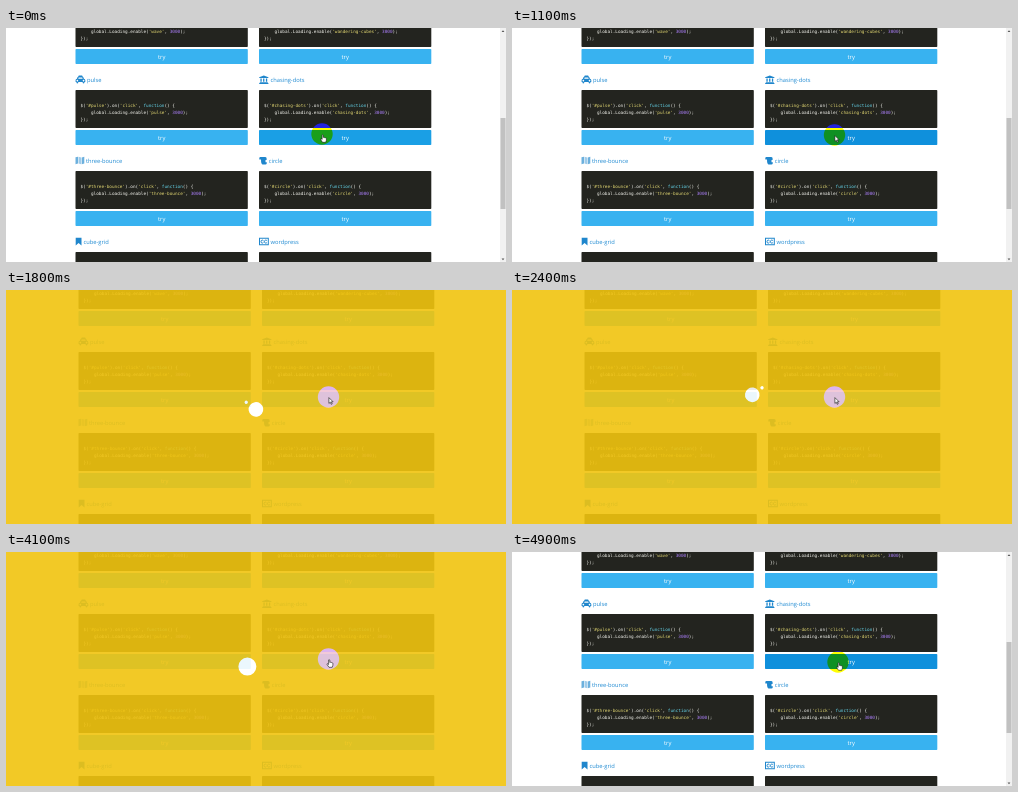
Recreate the animation shown at these times as an HTML page. Size 500x234 px, loop 5 s.

```html
<!DOCTYPE html>
<html lang="en">
<head>
<meta charset="utf-8">
<title>Loading demo</title>
<style>
html, body { margin: 0; width: 100%; height: 100%; overflow: hidden; background: #fff; }
svg { display: block; width: 100%; height: 100%; }
text { text-rendering: geometricPrecision; white-space: pre; }
.code { font: 4.36px "DejaVu Sans Mono", "Noto Sans Mono", monospace; fill: #f8f8f2; }
.str { fill: #e6db74; }
.key { fill: #66d9ef; }
.num { fill: #ae81ff; }
.head { font: 5.75px "Open Sans", "Noto Sans", sans-serif; fill: #1f8ad2; }
.try { font: 5.8px "Open Sans", "Noto Sans", sans-serif; fill: #fff; text-anchor: middle; }
.icon { fill: #1f86cc; }
#halo { mix-blend-mode: difference; }
</style>
</head>
<body>
<svg viewBox="0 0 500 234" xmlns="http://www.w3.org/2000/svg">
  <rect width="500" height="234" fill="#fff"/>
  <g id="page"></g>
  <g id="bar">
    <rect x="494" width="6" height="234" fill="#f1f1f1"/>
    <rect x="494.5" y="90" width="5" height="91" fill="#c1c1c1"/>
    <path d="M495.6 4l1.4-1.8 1.4 1.8zM495.6 230.4l1.4 1.8 1.4-1.8z" fill="#555"/>
  </g>
  <g id="loader" opacity=".9">
    <rect width="500" height="234" fill="#f1c40f"/>
    <g id="spin" fill="#fff">
      <circle cx="9" cy="-6"/>
      <circle cx="9" cy="6"/>
    </g>
  </g>
  <circle id="halo" r="10.7" fill="#00f"/>
  <g id="cursor" fill="#fff" stroke="#111" stroke-width=".6" stroke-linejoin="round">
    <path id="arrow" d="M0 0V5.8L1.4 4.6 2.3 6.7 3.3 6.3 2.4 4.2H4.2Z"/>
    <path id="hand" d="M-.3 .3Q.4-.4 .9 .4V2.8Q1.6 2.3 2 3 2.7 2.6 3 3.3 3.9 3 4 3.9V5.6L3.3 7.7H.1L-1.8 5Q-2.1 4-1.2 4.1L-.3 4.9Z"/>
  </g>
</svg>
<script>
const $ = id => document.getElementById(id);
const PITCH = 81, COLS = [69.5, 253], WIDTH = 172.3;

// Each icon is drawn from its own left edge and the heading's middle line.
const icons = {
  car: '<path fill-rule="evenodd" d="M3.3-4H6.6L7.1-3Q8-2.8 8.4-.9 9.8-.6 9.8 .6V2.4H8.9V3.4Q8.1 4.3 7.2 3.4V2.4H2.7V3.4Q1.8 4.3 1 3.4V2.4H.1V.6Q.1-.6 1.4-.9 1.8-2.8 2.8-3ZM3.2-2 2.7-.9H7.2L6.7-2ZM1.8 .2a.8 .8 0 1 0 .1 0ZM8 .2a.8 .8 0 1 0 .1 0Z"/>',
  bank: '<path d="M4.8-4.2 9.4-2.3V-1.5H.2V-2.3ZM1.4-1H2.7V2.2H1.4ZM4.1-1H5.4V2.2H4.1ZM6.9-1H8.2V2.2H6.9ZM.8 2.4H8.8V3.1H.8ZM.2 3.4H9.4V4.3H.2Z"/>',
  map: '<g opacity=".65"><path d="M0-3.3 2.5-3.8V3L0 3.7Z"/><path d="M3-3.8 5.8-3.2V3.6L3 3Z" opacity=".65"/><path d="M6.3-3.2 8.8-3.8V3L6.3 3.6Z"/></g>',
  scroll: '<path d="M.3-2.4Q.3-3.7 1.4-3.7H6.3Q7.8-3.5 7.6-2V-.6H6.5V1.6H7.8V2.6Q7.5 3.8 6.4 3.8H3.5Q2 3.6 2-1H.3Z"/>',
  mark: '<path d="M.2-3.8H6V3.9L3.1 1.5 .2 3.9Z"/>',
  cc: '<path fill-rule="evenodd" d="M0-3.8H9.8V3.7H0ZM1-2.8V2.7H8.8V-2.8Z"/><path d="M4.5-.8Q3.9-1.6 3.1-1.5 2-1.3 2 0 2 1.4 3.1 1.5 3.9 1.6 4.5 .7M8-.8Q7.4-1.6 6.6-1.5 5.5-1.3 5.5 0 5.5 1.4 6.6 1.5 7.4 1.6 8 .7" fill="none" stroke="#1f86cc" stroke-width="1"/>'
};

// name, icon, heading text offset
const rows = [
  [['wave'], ['wandering-cubes']],
  [['pulse', 'car', 11.5], ['chasing-dots', 'bank', 11.5]],
  [['three-bounce', 'map', 10.5], ['circle', 'scroll', 9.7]],
  [['cube-grid', 'mark', 8], ['wordpress', 'cc', 11.5]]
];

const span = (kind, s) => `<tspan class="${kind}">${s}</tspan>`;
const line = (x, y, s) => `<text class="code" x="${x}" y="${y}">${s}</text>`;

function card([name, icon, gap], x, y) {
  const title = icon
    ? `<g class="icon" transform="translate(${x} ${y + 51.6})">${icons[icon]}</g>
       <text class="head" x="${x + gap}" y="${y + 53.6}">${name}</text>` : '';
  const tx = x + 4.9;
  return title +
    `<rect x="${x}" y="${y + 62}" width="${WIDTH}" height="38" rx=".8" fill="#23241f"/>` +
    line(tx, y + 78.7, `$(${span('str', `'#${name}'`)}).on(${span('str', "'click'")}, ${span('key', 'function')}() {`) +
    line(tx + 10.5, y + 86, `global.Loading.enable(${span('str', `'${name}'`)}, ${span('num', '3000')});`) +
    line(tx, y + 93.3, '});') +
    `<rect id="btn-${name}" x="${x}" y="${y + 102}" width="${WIDTH}" height="15" rx=".8" fill="#38b2f0"/>` +
    `<text class="try" x="${x + WIDTH / 2}" y="${y + 111.7}">try</text>`;
}

$('page').innerHTML = rows.map((row, r) =>
  row.map((item, c) => card(item, COLS[c], (r - 1) * PITCH)).join('')).join('');

const LOOP = 5000, CLICK = 1100, SHOW = 1150, HIDE = 4150;
const button = $('btn-chasing-dots');
const dots = $('spin').children;
const path = [[0, 316, 106], [700, 322.5, 107], [4700, 322.5, 107], [4900, 326, 110], [LOOP, 326, 110]];

// cubic-bezier(.42, 0, .58, 1)
function easeInOut(x) {
  let lo = 0, hi = 1, s = .5;
  for (let i = 0; i < 20; i++) {
    s = (lo + hi) / 2;
    const v = 1 - s;
    if (1.26 * s * v * v + 1.74 * s * s * v + s * s * s < x) lo = s; else hi = s;
  }
  return s * s * (3 - 2 * s);
}

// Grows for one second, shrinks for the next.
function pulse(sec) {
  const p = sec % 2;
  return easeInOut(p < 1 ? p : 2 - p);
}

function pointer(t) {
  const i = path.findIndex(p => p[0] > t);
  const [t0, x0, y0] = path[i - 1], [t1, x1, y1] = path[i];
  const k = (t - t0) / (t1 - t0);
  return [x0 + (x1 - x0) * k, y0 + (y1 - y0) * k];
}

const show = (id, on) => $(id).setAttribute('display', on ? 'inline' : 'none');

function draw(t) {
  const busy = t >= SHOW && t < HIDE;
  show('loader', busy);
  show('bar', !busy);
  $('page').setAttribute('transform', `translate(${busy ? 3 : 0} 0)`);
  button.setAttribute('fill', busy ? '#38b2f0' : t < 900 ? '#1a9fe5' : '#0f90dc');

  if (busy) {
    const sec = Math.max(0, t - CLICK) / 1000;
    $('spin').setAttribute('transform', `translate(250.4 108.6) rotate(${sec * 180})`);
    dots[0].setAttribute('r', 9 * pulse(sec));
    dots[1].setAttribute('r', 9 * pulse(sec + 1));
  }

  const [x, y] = pointer(t);
  const arrow = t >= 1050 && t < 4050;
  $('halo').setAttribute('cx', x);
  $('halo').setAttribute('cy', y);
  $('cursor').setAttribute('transform', `translate(${x + .4} ${y + .6})`);
  show('arrow', arrow);
  show('hand', !arrow);
}

const start = performance.now();
function tick() {
  draw((performance.now() - start) % LOOP);
  requestAnimationFrame(tick);
}
tick();
</script>
</body>
</html>
```
